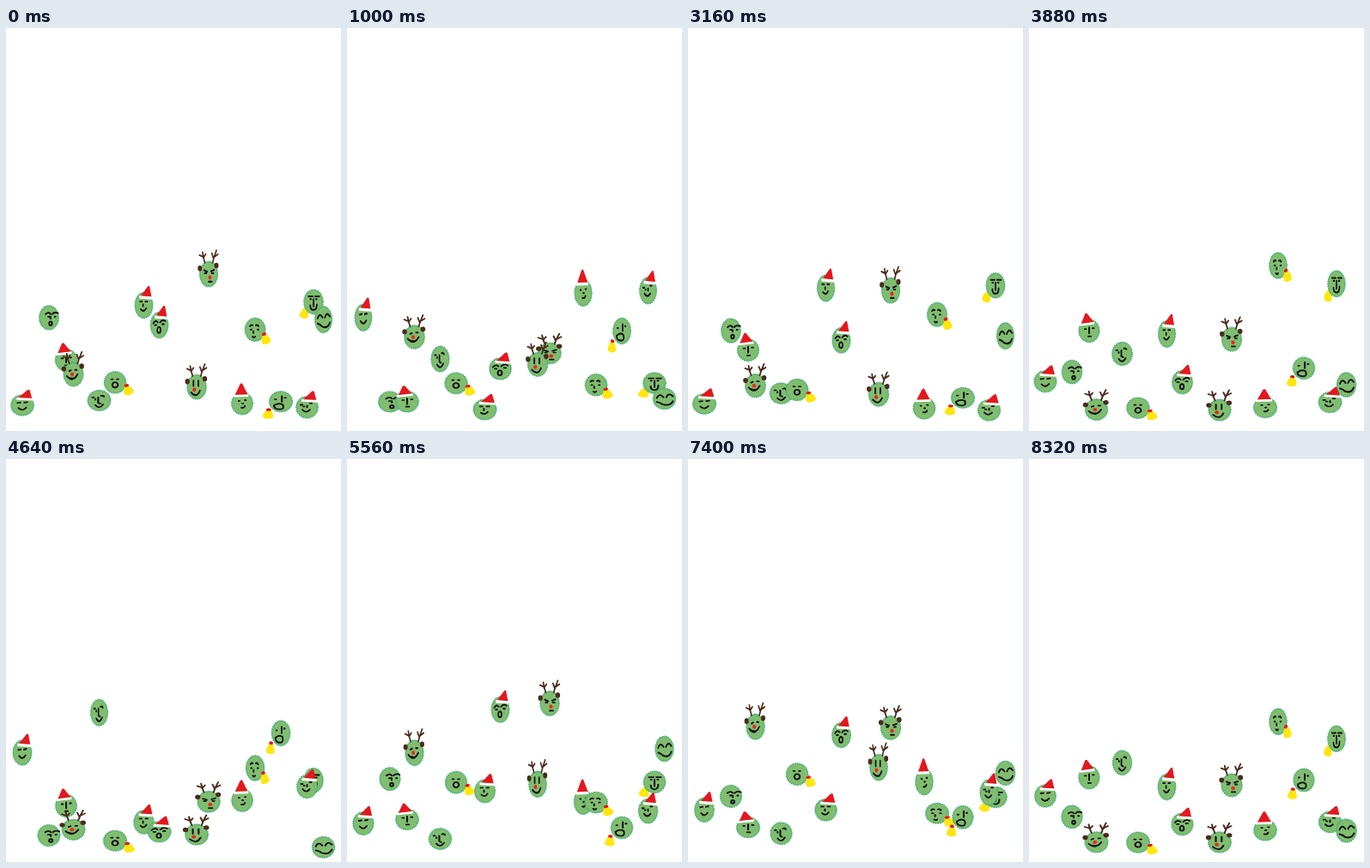
Animation, 390 px wide and 470 px high, one loop 8360 ms. Source, as an HTML page with a canvas:

```html
<!DOCTYPE html>
<html>
<head>
<meta charset="utf-8">
<style>
html, body { margin: 0; width: 100%; height: 100%; overflow: hidden; background: #fff; }
canvas { display: block; }
</style>
</head>
<body>
<canvas id="stage" width="390" height="470"></canvas>
<script>
const ctx = document.getElementById('stage').getContext('2d');
const LOOP = 8360, STEP = 40, PERIOD = 1880 / 3;
const RED = '#e5171e', BROWN = '#4a2a1c', YELLOW = '#ffe60f', INK = '#111';

const hatRight = [-4, -10, 10, -9, 6.5, -20];
const hatLeft = [-9, -8.5, 5, -10.5, -3.5, -20.5];
const hatTall = [-8, -10.5, 6, -11, -1, -24];

// x, ground: resting centre; land: time of touching ground; jump: height;
// stretch: how far the body lengthens in the air
const sprouts = [
  { x: 19, ground: 440, land: 623, jump: 149, stretch: 1, hat: hatRight,
    face: 'M-5-3l3-.5M2-3.5l3-.5M-4 3.5q4 5 8-.5' },
  { x: 50, ground: 444, land: 298, jump: 115, stretch: .6,
    face: 'M-4-4q4-3 6 0M4-4q3-3 7-1M-1-1h2M7-1h1M2-1v2', open: [2, 6.5, 1.8, 2] },
  { x: 70, ground: 437.5, land: 411, jump: 95, stretch: .4, hat: hatLeft,
    face: 'M-5-2h1.5M4-3h1.5M0-4v7M-1 6.5h3' },
  { x: 78.5, ground: 447, land: 152, jump: 156, stretch: .8, antlers: true, nose: [-1.5, 0],
    face: 'M-5-3.5l2-1M2-5h2M-8 2q7 8 13-2M-5 4q5 2 8-1' },
  { x: 108.5, ground: 444, land: 555, jump: 150, stretch: 1,
    face: 'M-7-4h1.5M-4-2v1M2-6q2-1 3 1M-1-4v7l2 1M-4 6q4 6 8-1' },
  { x: 127, ground: 448, land: 188, jump: 84, stretch: .25, bell: [14, 9, -.3],
    face: 'M-4-4h1.5M2-4h1.5', open: [0, 3, 3, 3.2] },
  { x: 160.5, ground: 446, land: 350, jump: 150, stretch: 1, hat: hatRight,
    face: 'M-5-4h2.5M2-4h2.5M-1-1v2M-4 4q4 4 7-1' },
  { x: 178.5, ground: 435, land: 229, jump: 150, stretch: .9, hat: hatRight,
    face: 'M-8-2q3-4 6-1M1-3q4-4 7-1M-6 0h2M4-1h2', open: [-.5, 5, 2.2, 3] },
  { x: 236, ground: 401, land: 265, jump: 150, stretch: .8, antlers: true, nose: [1.5, 3.5],
    face: 'M-6-4l4 1.5M3-3l4-1.5M-5-1h2M4-1h2M0 8h4' },
  { x: 222, ground: 447, land: 154, jump: 100, stretch: .9, antlers: true, nose: [-3, 3],
    face: 'M-4-7v6M2-7v6M-7 6q7 7 11-2' },
  { x: 275, ground: 447, land: 71, jump: 146, stretch: 1, hat: hatTall,
    face: 'M-4-3h1M3-4h1M0 0h1M-1 5q3 1 4-2' },
  { x: 290, ground: 421.5, land: 426, jump: 150, stretch: .9, bell: [12, 10.5, -.3],
    face: 'M-6-4q1-2 3-1M1-5q2-1 3 1M-5 0h1M3 0h1M-2 2v2M-3 8q2 2 3 0' },
  { x: 320, ground: 437.5, land: 596, jump: 150, stretch: .9, bell: [-13, 16, .1],
    face: 'M-6-3h1M1-7v7M4-5h1M-7 5q5-4 9-1q2 6-3 6q-6 0-6-5' },
  { x: 358, ground: 414.5, land: 388, jump: 150, stretch: .9, bell: [-11, 12, .25, true],
    face: 'M-6-6h5M2-6h5M-4-3h1M3-3h1M0-3v8M-4 4q0 5 4 5q4 0 4-6' },
  { x: 350.5, ground: 446.5, land: 47, jump: 150, stretch: 1, hat: hatRight,
    face: 'M-7-3h2M-4-1h1M3-5h2M0-2v2M-5 3q4 5 8 0' },
  { x: 369.5, ground: 454, land: 265, jump: 150, stretch: .95,
    face: 'M-8-1q2-5 5-3l2 2M2-2q2-5 5-3l2 2M-8 4q4 1 6 3q8 3 11-4' }
];
for (const s of sprouts) s.face = new Path2D(s.face);

const bellShape = new Path2D('M-2-5Q0-6 2-5Q5-2 5.5 3Q5 6 2 6Q0 7-2 6Q-5 6-5.5 3Q-5-2-2-5Z');
const antlerShape = new Path2D('M-5-12L-7-18L-8-23M-7-18L-12-20M-7-17L-4-21M5-12L7-18L10-25M7-18L12-21M6-17L4-22');

function ellipse(x, y, rx, ry) {
  ctx.beginPath();
  ctx.ellipse(x, y, rx, ry, 0, 0, 7);
}

function disc(x, y, rx, ry, color) {
  ctx.fillStyle = color;
  ellipse(x, y, rx, ry);
  ctx.fill();
}

function polygon(points, color) {
  ctx.fillStyle = color;
  ctx.beginPath();
  for (let i = 0; i < points.length; i += 2) ctx.lineTo(points[i], points[i + 1]);
  ctx.fill();
}

function drawBody() {
  disc(0, 0, 11.8, 13.4, '#80bd70');
  ctx.lineWidth = 1;
  ctx.strokeStyle = '#62b973';
  ellipse(0, 0, 11.2, 12.8);
  ctx.stroke();
  ctx.lineCap = 'butt';
  ctx.strokeStyle = '#35a878';
  ctx.setLineDash([1.3, 1.3]);
  ellipse(0, 0, 12, 13.6);
  ctx.stroke();
  ctx.setLineDash([]);
  ctx.lineCap = 'round';
}

function drawHat([ax, ay, bx, by, tx, ty]) {
  polygon([ax - 2, ay, bx + 1, by, bx + 1, by + 3, ax - 2, ay + 3], '#fff');
  polygon([ax, ay, bx, by, tx + 1, ty, tx - 1, ty], RED);
}

function drawAntlers() {
  ctx.strokeStyle = BROWN;
  ctx.lineWidth = 1.8;
  ctx.stroke(antlerShape);
  disc(-11.5, -6, 2.8, 3, BROWN);
  disc(10, -9, 2.8, 3, BROWN);
}

function drawBell([x, y, tilt, plain]) {
  ctx.save();
  ctx.translate(x, y);
  ctx.rotate(tilt);
  ctx.fillStyle = YELLOW;
  ctx.fill(bellShape);
  if (!plain) disc(0, -5.5, 2.6, 1.8, RED);
  ctx.restore();
}

function drawSprout(s, t) {
  const turn = Math.PI * (t - s.land) / PERIOD;
  const lift = s.jump * (1 - Math.abs(Math.cos(turn)));
  // the stretch trails the jump a little
  const pull = s.stretch * (1 - Math.cos(2 * turn - .45)) / 2;
  ctx.save();
  ctx.translate(s.x, s.ground - lift);
  ctx.scale((28 - 7.5 * pull) / 24.6, (25 + 7.5 * pull) / 28);
  if (s.bell && s.bell[3]) drawBell(s.bell);
  drawBody();
  if (s.antlers) drawAntlers();
  ctx.strokeStyle = INK;
  ctx.lineWidth = 1.9;
  ctx.stroke(s.face);
  if (s.open) {
    ellipse(...s.open);
    ctx.stroke();
  }
  if (s.nose) disc(...s.nose, 2.2, 2.2, '#f0231c');
  if (s.hat) drawHat(s.hat);
  if (s.bell && !s.bell[3]) drawBell(s.bell);
  ctx.restore();
}

ctx.lineCap = ctx.lineJoin = 'round';
const start = performance.now();

function frame() {
  let t = Math.floor((performance.now() - start) % LOOP / STEP) * STEP;
  if (t > 3900) t -= 14; // one short hitch in the rhythm
  ctx.fillStyle = '#fff';
  ctx.fillRect(0, 0, 390, 470);
  for (const s of sprouts) drawSprout(s, t);
  requestAnimationFrame(frame);
}
frame();
</script>
</body>
</html>
```
